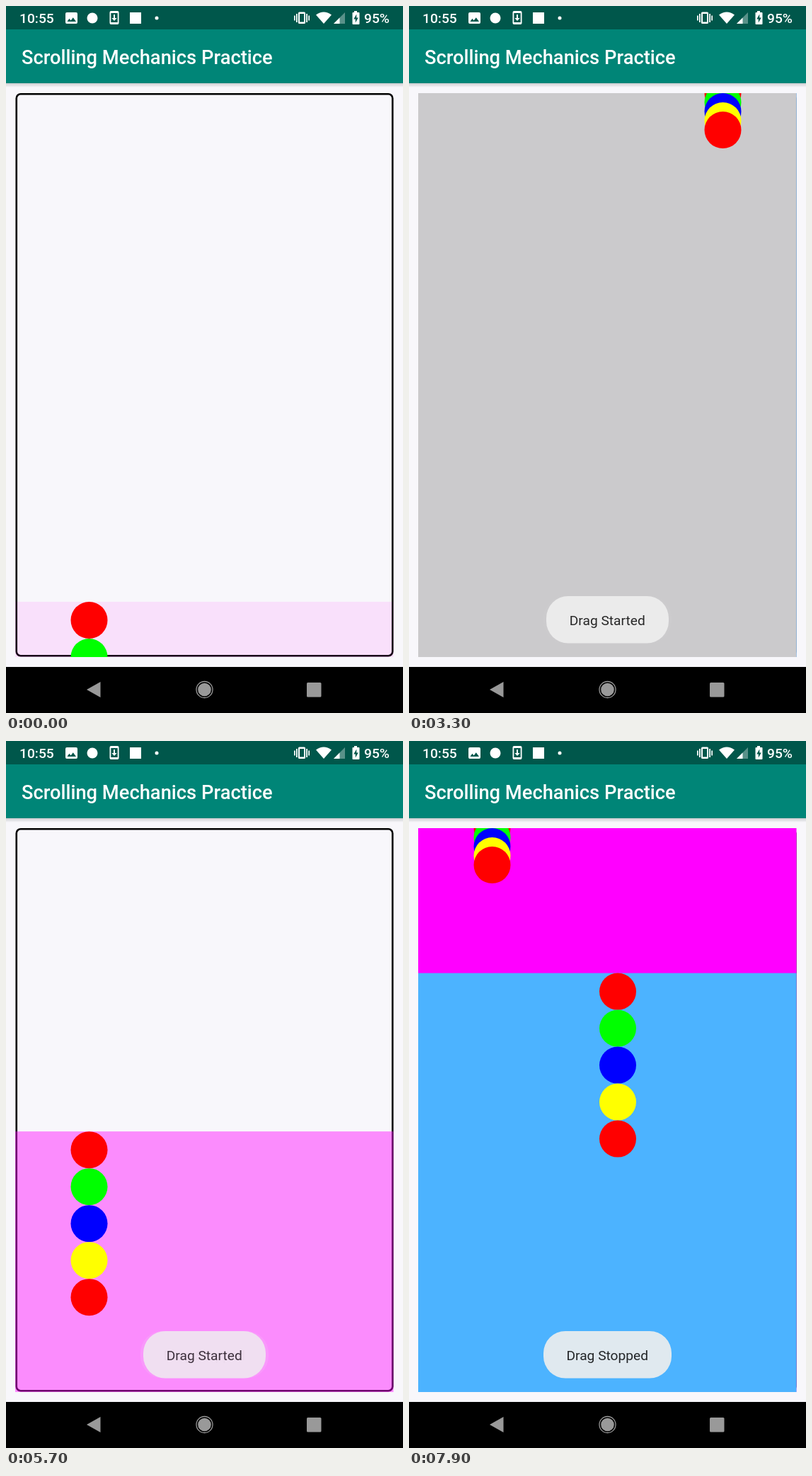
An HTML page for the animation above (8 s loop, 561 by 998 pixels).

```html
<!DOCTYPE html>
<html lang="en">
<head>
<meta charset="utf-8">
<title>Scrolling Mechanics Practice</title>
<style>
  html, body { margin: 0; width: 100%; height: 100%; overflow: hidden; background: #f8f7fb; }
  svg { display: block; width: 561px; height: 998px; font-family: Roboto, sans-serif; }
  .bar { font-weight: 500; fill: #fff; }
</style>
</head>
<body>
<svg viewBox="0 0 561 998">
  <defs>
    <clipPath id="frame"><rect x="13" y="123" width="534.5" height="796"/></clipPath>
    <linearGradient id="shade" x2="0" y2="1">
      <stop stop-color="#000" stop-opacity=".17"/>
      <stop offset="1" stop-color="#000" stop-opacity="0"/>
    </linearGradient>
  </defs>

  <rect width="561" height="998" fill="#f8f7fb"/>
  <rect x="14.75" y="124.25" width="531.5" height="793" rx="6" fill="none" stroke="#000" stroke-width="2.6"/>
  <g id="pages" clip-path="url(#frame)"></g>
  <g id="toasts"></g>

  <!-- app bar -->
  <rect y="109" width="561" height="6" fill="url(#shade)"/>
  <rect y="32" width="561" height="77" fill="#008577"/>
  <rect width="561" height="33" fill="#00574b"/>
  <text class="bar" x="22" y="81.5" font-size="27.3">Scrolling Mechanics Practice</text>

  <!-- status bar -->
  <g class="bar" font-size="19.2">
    <text x="19" y="24">10:55</text>
    <text x="506" y="24">95%</text>
    <path fill-rule="evenodd" d="M86 9h13q2 0 2 2v12q0 2-2 2H86q-2 0-2-2V11q0-2 2-2zM86.500 22h12.500l-4.200-5.800-3.200 4.200-2.200-2.600z"/>
    <circle cx="122" cy="17" r="7.500"/>
    <path fill-rule="evenodd" d="M148.500 7h9q2 0 2 2v15q0 2-2 2h-9q-2 0-2-2V9q0-2 2-2zM148.300 10v13h9.400V10zM152 12h2v5h2.700l-3.700 4-3.700-4h2.700z"/>
    <rect x="175" y="9" width="16" height="16"/>
    <circle cx="213" cy="17" r="2.500"/>
    <path fill-rule="evenodd" d="M414.500 8.500h7q1.500 0 1.500 1.500v13.500q0 1.500-1.500 1.500h-7q-1.500 0-1.500-1.500V10q0-1.500 1.500-1.500zM415 11v11.500h6V11zM410 11h1.800v12H410zM424.200 11h1.800v12h-1.800zM407 13.500h1.700v7H407zM427.300 13.500h1.700v7h-1.700z"/>
    <path d="M438 12.500q11-8 22 0L449 25z"/>
    <path d="M479 9v16h-16z" opacity=".35"/>
    <path d="M471.500 16.500V25H463z"/>
    <path fill-rule="evenodd" d="M492 7h4v2h2.500q1 0 1 1v15q0 1-1 1h-8q-1 0-1-1V10q0-1 1-1h1.500zM495.300 11.500l-4 7h2.500v5l4-7h-2.500z"/>
  </g>

  <!-- navigation bar -->
  <rect y="933" width="561" height="65"/>
  <g fill="#999">
    <path d="M114 965 133.500 954v22z"/>
    <circle cx="280.500" cy="965" r="9.300"/>
    <circle cx="280.500" cy="965" r="11.500" fill="none" stroke="#999" stroke-width="1.300"/>
    <rect x="425" y="955" width="20.500" height="20.500" rx="1.500"/>
  </g>
</svg>
<script>
const LOOP = 8000, TOP = 123, BOTTOM = 919, FADE = 300;
const DOTS = ['#f00', '#0f0', '#00f', '#ff0', '#f00'];

// Each page: colour, dot column, and [time, top edge] steps.
const PAGES = [
  { color: '#f0f', x: 117.5, steps: [
    [0, 841], [700, 841], [900, 610], [1100, 402], [1300, TOP],
    [5450, TOP], [5800, 720], [6000, BOTTOM],
    [6040, BOTTOM], [6200, 769], [6500, 360], [6750, TOP]] },
  { color: '#0ff', x: 295, steps: [
    [1320, BOTTOM], [1560, 400], [1720, TOP],
    [4840, TOP], [5100, 496], [5300, 800], [5440, BOTTOM],
    [7250, BOTTOM], [7600, 420], [7900, 328], [8000, 290]] },
  { color: '#cbcacc', x: 443.5, steps: [
    [1760, BOTTOM], [2000, 339], [2250, TOP],
    [3320, TOP], [3700, 560], [4000, BOTTOM]] }
];

// Drags start and stop in turn at these times.
const TOASTS = [700, 900, 1310, 1540, 1740, 2120, 3010, 3780,
  4840, 5200, 5440, 5760, 6020, 6480, 7230, 7610];

const clamp = v => Math.max(0, Math.min(1, v));

function add(parent, tag, attrs, text) {
  const el = document.createElementNS('http://www.w3.org/2000/svg', tag);
  for (const k in attrs) el.setAttribute(k, attrs[k]);
  if (text) el.textContent = text;
  return parent.appendChild(el);
}

function at(steps, t) {
  const i = steps.findIndex(s => s[0] > t);
  if (i === 0) return steps[0][1];
  if (i < 0) return steps[steps.length - 1][1];
  const [t0, a] = steps[i - 1], [t1, b] = steps[i];
  return a + (b - a) * (t - t0) / (t1 - t0);
}

const pagesEl = document.getElementById('pages');
for (const p of PAGES) {
  p.el = add(pagesEl, 'g', {});
  p.bg = add(p.el, 'rect', { x: 13, width: 535, height: 800, fill: p.color });
  p.dots = DOTS.map(fill => add(p.el, 'circle', { cx: p.x, r: 26, fill }));
}

const toastsEl = document.getElementById('toasts');
const toasts = TOASTS.map((start, i) => {
  const el = add(toastsEl, 'g', {});
  const w = i % 2 ? 181 : 173;
  add(el, 'rect', { x: 280.5 - w / 2, y: 833, width: w, height: 66.5, rx: 31, fill: '#eee', opacity: .94 });
  add(el, 'text', { x: 280.3, y: 874, 'font-size': 19.2, 'text-anchor': 'middle', fill: '#222' },
    i % 2 ? 'Drag Stopped' : 'Drag Started');
  return { el, start, end: TOASTS[i + 1] || LOOP };
});

function draw(t) {
  for (const p of PAGES) {
    const top = at(p.steps, t);
    p.el.style.display = top < BOTTOM ? '' : 'none';
    const shown = (BOTTOM - top) / (BOTTOM - TOP);
    p.bg.setAttribute('y', top);
    p.bg.setAttribute('opacity', shown * (.943 + .057 * shown ** 12));
    // The dots bunch up as the page docks.
    const open = clamp((top - TOP) / 104);
    p.dots.forEach((d, i) => d.setAttribute('cy', top + 13 * i + open * (26 + 39 * i)));
  }
  for (const { el, start, end } of toasts) {
    const o = clamp((t - start) / FADE) * (1 - clamp((t - end) / FADE));
    el.style.display = o ? '' : 'none';
    el.setAttribute('opacity', o);
  }
}

const begin = performance.now();
function tick(now) {
  draw(Math.max(0, now - begin) % LOOP);
  requestAnimationFrame(tick);
}
draw(0);
requestAnimationFrame(tick);
</script>
</body>
</html>
```
